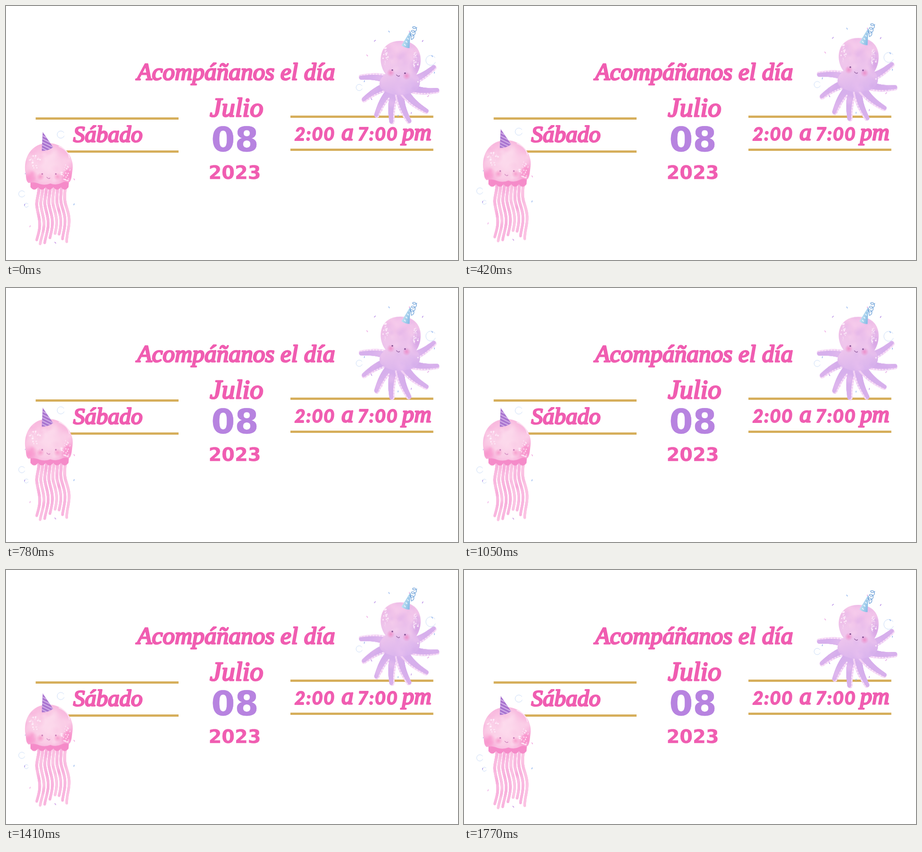
Recreate the animation shown at these times as an HTML page with a canvas. Size 998 px wide and 561 px high, loop 1.8 s.

```html
<!DOCTYPE html>
<html lang="es">
<head>
<meta charset="utf-8">
<title>Invitación</title>
<style>
html, body { margin: 0; width: 100%; height: 100%; overflow: hidden; background: #fff; }
canvas { display: block; width: 998px; height: 561px; }
</style>
</head>
<body>
<canvas id="stage" width="998" height="561"></canvas>
<script>
const W = 998, H = 561, LOOP = 1800, RISE = 7.2, TAU = 2 * Math.PI;
const PINK = '#f05db1', PURPLE = '#b783e0', GOLD = '#d6ae5b';
const SCRIPT = 'italic SIZEpx "Liberation Serif", "Times New Roman", serif';
const WIDE = 'bold SIZEpx "DejaVu Sans", sans-serif';
const CLOCK = 'italic bold SIZEpx Lato, sans-serif';
const stage = document.getElementById('stage').getContext('2d');

function layer() {
  const c = document.createElement('canvas');
  c.width = W;
  c.height = H;
  return c.getContext('2d');
}

let seed = 11;
function rnd(a = 0, b = 1) {
  seed = (seed * 16807) % 2147483647;
  return a + (b - a) * seed / 2147483647;
}

// ---- lettering and rules ----
const card = layer();

function outline(text, x, y, color, width) {
  card.strokeStyle = color;
  card.lineWidth = width;
  card.strokeText(text, x, y);
}

function write(text, x, y, size, font, weight, color = PINK) {
  card.font = font.replace('SIZE', size);
  card.letterSpacing = font === CLOCK ? '2px' : '0px';
  card.fillStyle = color;
  outline(text, x, y, color, weight);
  card.fillText(text, x, y);
}

function rules(x, y) {
  card.fillStyle = GOLD;
  for (const top of [y, y + 73]) card.fillRect(x, top, 315.5, 5);
}

function drawCard() {
  card.fillStyle = '#fff';
  card.fillRect(0, 0, W, H);
  rules(65.5, 246);
  rules(628, 242);

  card.textAlign = 'center';
  card.lineJoin = 'round';
  write('Acompáñanos el día', 508, 162.5, 53.5, SCRIPT, 3.2);
  write('Julio', 509, 243.5, 59, SCRIPT, 3.2);
  write('Sábado', 225, 300, 51, SCRIPT, 3.2);
  write('08', 505.5, 321, 75, WIDE, 0.5, PURPLE);
  write('2023', 505, 381.5, 41.5, WIDE, 0.5);
  write('2:00', 682, 296.5, 41, CLOCK, 2);
  write('7:00', 821, 296.5, 41, CLOCK, 2);
  write('a', 754, 295.5, 53, SCRIPT, 3.2);
  outline('pm', 907, 295.5, '#fff', 14);
  write('pm', 907, 295.5, 53, SCRIPT, 3.2);
}

// ---- sea creatures ----
const sea = layer();

function dot(x, y, r, color) {
  sea.fillStyle = color;
  sea.beginPath();
  sea.arc(x, y, r, 0, TAU);
  sea.fill();
}

function shape(d, color) {
  sea.fillStyle = color;
  sea.fill(new Path2D(d));
}

function line(d, color, width) {
  sea.strokeStyle = color;
  sea.lineWidth = width;
  sea.lineCap = 'round';
  sea.stroke(new Path2D(d));
}

function blend(gradient, ...colors) {
  colors.forEach((c, i) => gradient.addColorStop(i / (colors.length - 1), c));
  return gradient;
}

function glow(x, y, r, rgb, alpha) {
  dot(x, y, r, blend(sea.createRadialGradient(x, y, 0, x, y, r), `rgba(${rgb},${alpha})`, `rgba(${rgb},0)`));
}

// Random point inside an ellipse
function inside(x, y, rx, ry) {
  const a = rnd(0, TAU), k = Math.sqrt(rnd());
  return [x + rx * k * Math.cos(a), y + ry * k * Math.sin(a)];
}

// Soft stains that stay on what is already painted
function wash(n, x, y, rx, ry, ...tints) {
  sea.globalCompositeOperation = 'source-atop';
  for (let i = 0; i < n; i++) glow(...inside(x, y, rx, ry), rnd(6, 19), tints[i % tints.length], 0.38);
  sea.globalCompositeOperation = 'source-over';
}

function speckle(n, x, y, rx, ry) {
  for (let i = 0; i < n; i++) dot(...inside(x, y, rx, ry), rnd(0.6, 1.9), 'rgba(255,244,253,.8)');
}

function bubble(x, y, r) {
  sea.strokeStyle = 'rgba(150,185,240,.5)';
  sea.lineWidth = 1;
  sea.beginPath();
  sea.arc(x, y, r, 0.4, 5.7);
  sea.stroke();
}

// Short dashes in a loose ring
function confetti(n, x, y, rx, ry) {
  const tints = ['#8fb4ee', '#eea5e2', '#b68ce6'];
  for (let i = 0; i < n; i++) {
    const a = TAU * (i + rnd(0, 0.6)) / n, px = x + rx * Math.cos(a), py = y + ry * Math.sin(a);
    line(`M${px} ${py}l${rnd(-3, 3)} 2.5`, tints[i % 3], 1.6);
  }
}

function face(x, y, gap, tilt, ink, blush) {
  for (const s of [-1, 1]) {
    glow(x + s * gap * 1.25, y + s * tilt + 6, 9, blush, 0.55);
    dot(x + s * gap, y + s * tilt, 1.8, ink);
  }
  line(`M${x - 5} ${y + 7}q4 5 7 2`, ink, 1.2);
}

// Eight arms fan out from the body, each bowed the same way round
function armPoint(i, t, shift = 0) {
  const deg = 190 - 30 * i - 6 * Math.sin(i * Math.PI / 3);
  const a = deg * Math.PI / 180, bow = 7 * Math.sin(Math.PI * t) + shift;
  return [868 + 88 * t * Math.cos(a) - bow * Math.sin(a), 172 + 88 * t * Math.sin(a) + bow * Math.cos(a)];
}

function arm(i) {
  const side = i > 0 && i < 4 ? -1 : 1;
  const girth = t => 12 - 7 * t;
  for (let t = 0.2; t <= 0.98; t += 0.01) dot(...armPoint(i, t), girth(t), '#f3d2f4');
  for (let t = 0.2; t <= 0.98; t += 0.01) dot(...armPoint(i, t, -2 * side), girth(t) * 0.8, '#d7b0ec');
  return () => {
    for (let t = 0.45; t < 1; t += 0.075)
      dot(...armPoint(i, t, side * girth(t) * 0.75), 1.9 - t * 0.6, 'rgba(255,240,252,.85)');
  };
}

function octopus() {
  confetti(13, 868, 146, 78, 95);
  const suckers = Array.from({ length: 8 }, (_, i) => arm(i));
  shape('M838 150C819 125 823 77 871 77C920 77 924 125 906 152C918 164 918 182 896 192' +
    'C874 198 856 198 840 190C816 180 824 160 838 150Z',
    blend(sea.createLinearGradient(850, 77, 880, 196), '#f2bce5', '#efc6ec', '#dab4ee'));
  wash(34, 871, 114, 42, 38, '247,204,238', '226,180,235', '251,216,239');
  wash(46, 865, 200, 90, 58, '209,168,234', '238,196,241', '220,182,240');
  wash(8, 909, 118, 6, 30, '211,160,229');
  suckers.forEach(draw => draw());
  speckle(26, 905, 119, 6, 19);
  speckle(20, 838, 110, 6, 20);
  face(867, 145, 14, 3.5, '#7c4a8c', '240,105,175');

  shape('M873 87L893 55L891 93Q881 93 873 87Z',
    blend(sea.createLinearGradient(876, 75, 894, 80), '#c3e4f3', '#85b9e5'));
  for (let i = 0; i < 7; i++) dot(880 + i * 1.7, 85 - i * 3.4 + 5 * (i % 2), 1.2, '#edf9ff');
  let curl = 'M893 58';
  for (let t = 0; t < 1; t += 0.02)
    curl += `L${895 + 9 * t + 5 * Math.sin(t * 20)} ${70 - 26 * t + 4 * Math.cos(t * 20)}`;
  line(curl, '#73a5da', 1.4);
  bubble(938, 120, 11);
  bubble(780, 180, 7);
}

function jellyfish() {
  confetti(11, 96, 412, 56, 112);
  for (let i = 0; i < 8; i++) {
    const top = 73 + 8.2 * i, spread = 1.7 * i - 4;
    const end = 517 + 11 * Math.sin(i * 1.1) - i;
    for (let y = 396; y <= end; y += 0.8) {
      const t = (y - 396) / 125;
      const x = top + spread * t + 4.2 * Math.sin(t * 7.4 + 2.6 + i * 0.12) * Math.min(1, t * 3);
      dot(x, y, 3.3 - 0.5 * t, i % 3 === 1 ? '#fbc3e3' : '#f9b6df');
    }
  }
  wash(36, 108, 465, 45, 65, '246,160,214', '253,210,235', '248,180,221');

  let frill = 'M54 387H139L138 400';
  for (let i = 0; i < 5; i++) frill += 'q-8.4 11 -16.8 0';
  shape(frill + 'Z', '#f58bc9');
  shape('M50 391C43 386 45 378 43 369C37 333 58 302 94 303C128 303 151 333 147 361' +
    'C145 374 145 388 138 390Q130 386 122 391Q110 397 98 392Q86 397 74 393Q61 387 50 391Z',
    blend(sea.createRadialGradient(94, 351, 12, 94, 353, 62), '#fcd7eb', '#fac9e5', '#f7a8d8'));
  wash(44, 94, 347, 52, 43, '252,213,233', '249,184,222', '254,224,239');
  wash(9, 137, 375, 11, 13, '248,135,199');
  wash(7, 54, 378, 10, 10, '248,145,203');
  speckle(30, 62, 344, 14, 16);
  speckle(28, 133, 367, 11, 20);
  line('M117 310Q137 318 140 335', 'rgba(255,242,250,.75)', 2);
  face(95, 371, 15, 0, '#c575b3', '245,120,185');

  const cone = 'M81 278L104 312Q94 320 79 320Z';
  shape(cone, '#a873cf');
  sea.save();
  sea.clip(new Path2D(cone));
  for (let y = 277; y < 330; y += 7) line(`M76 ${y}l32 16`, '#d5b2ea', 2.2);
  sea.restore();
  bubble(35, 415, 7);
  bubble(45, 440, 4.5);
  bubble(121, 284, 8);
}

drawCard();
octopus();
jellyfish();

function frame(now) {
  const lift = RISE * (1 - Math.cos(TAU * now / LOOP));
  stage.drawImage(card.canvas, 0, 0);
  stage.drawImage(sea.canvas, 0, -lift);
  requestAnimationFrame(frame);
}
requestAnimationFrame(frame);
</script>
</body>
</html>
```
